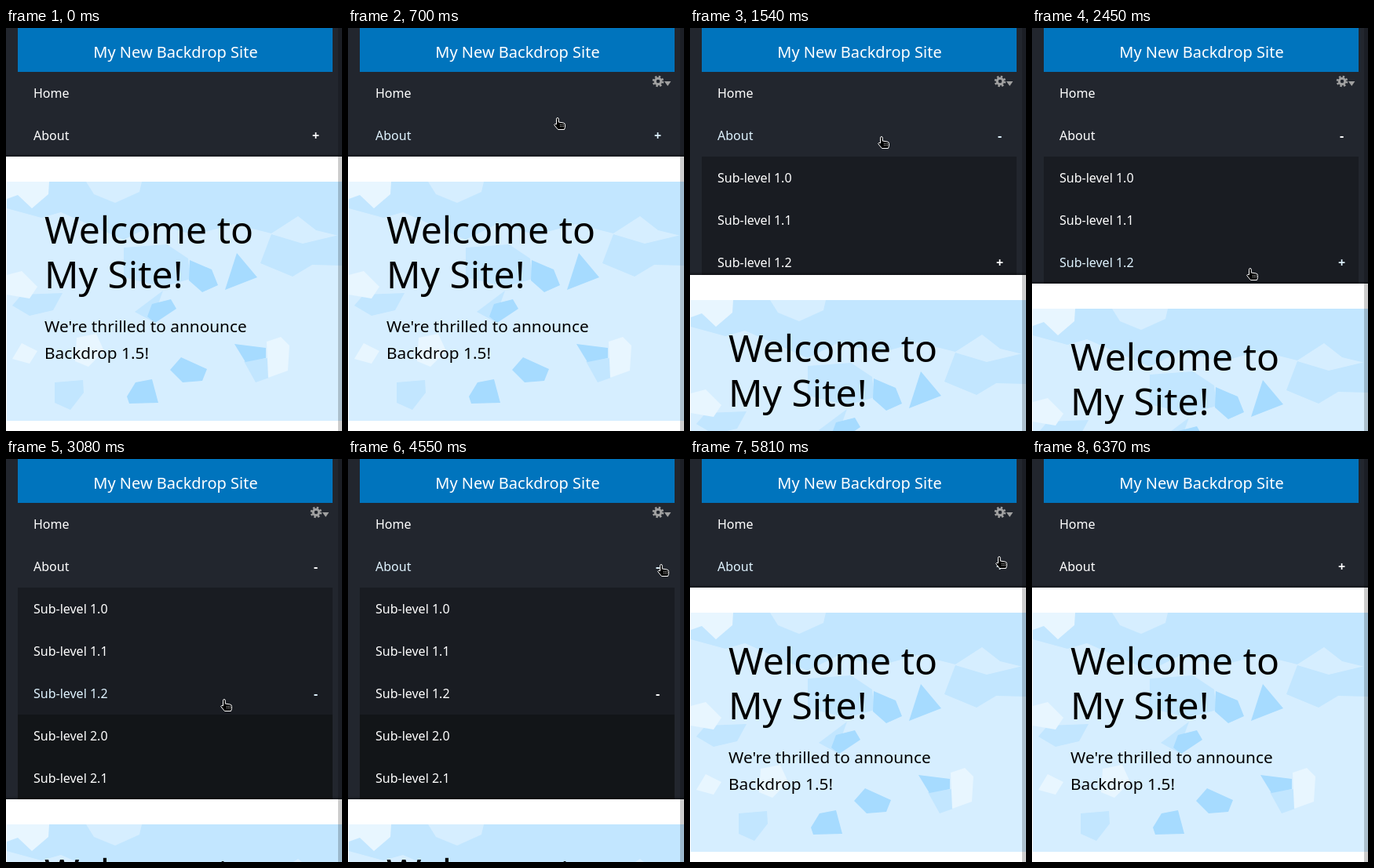
An HTML page for the animation above (8750 ms loop, 428 by 514 pixels).

```html
<!DOCTYPE html>
<html lang="en">
<head>
<meta charset="utf-8">
<title>Mobile menu</title>
<style>
  html, body { margin: 0; width: 100%; height: 100%; overflow: hidden; background: #fff; }
  svg { display: block; }
  text { font-family: "Noto Sans", "Open Sans", sans-serif; }
  #menu text { font-size: 16px; fill: #fff; }
  #menu .sign { font-weight: 700; text-anchor: middle; }
  #menu .hover text { fill: #dff3ff; }
</style>
</head>
<body>
<svg width="428" height="514" viewBox="0 0 428 514">
  <defs>
    <linearGradient id="shade" x2="0" y2="1">
      <stop offset="0" stop-opacity="0"/>
      <stop offset="1" stop-opacity=".4"/>
    </linearGradient>
  </defs>

  <g id="page">
    <svg x="1" y="196" width="427" height="305" viewBox="1 196 427 305">
      <path fill="#d6eeff" d="M1 196h427v305H1z"/>
      <g fill="#c2e6ff">
        <path d="M1 196H428V266L395 258 372 240 338 262 290 250 240 264 190 250 150 270 70 235 45 242 1 230z"/>
        <path d="M338 263 378 275 428 263V303L390 302 365 317 324 300z"/>
        <path d="M150 280 205 276 232 294 235 320 200 330 150 318z"/>
        <path d="M20 340 72 338 60 360 30 367 8 354z"/>
        <path d="M62 452 98 449 99 465 82 487 62 478z"/>
        <path d="M303 425 334 421 335 446 318 452z"/>
        <path d="M164 362 200 335 186 374z"/>
      </g>
      <path fill="#d6eeff" d="M102 196H173L170 209 139 223 112 212z"/>
      <g fill="#a6dbff">
        <path d="M234 296 262 308 270 328 250 337 233 322z"/>
        <path d="M294 287 320 318 279 334z"/>
        <path d="M186 352 210 346 217 358 190 376 180 368z"/>
        <path d="M291 403 331 408V421L305 426z"/>
        <path d="M223 420 256 435 250 450 225 452 209 436z"/>
        <path d="M165 452 186 448 194 478 157 479 154 470z"/>
      </g>
      <g fill="#e8f6ff">
        <path d="M1 196H55L54 212 33 230 15 213 1 218z"/>
        <path d="M332 400 350 394 361 405 359 437 334 446z"/>
        <path d="M90 395 115 390 125 412 105 432 88 425z"/>
        <path d="M1 315 20 310 40 330 30 345 1 340z"/>
        <path d="M20 402 40 412 30 428 8 422z"/>
      </g>
    </svg>
    <g font-size="48">
      <text x="49" y="275">Welcome to</text>
      <text x="49" y="332">My Site!</text>
    </g>
    <g font-size="20.8">
      <text x="49" y="388">We're thrilled to announce</text>
      <text x="49" y="422">Backdrop 1.5!</text>
    </g>
  </g>

  <svg id="menu" width="428" height="164">
    <path fill="#22262e" d="M0 0h428v514H0z"/>
    <path fill="#191c22" d="M15 164h401v162H15z"/>
    <path fill="#121518" d="M15 326h401v108H15z"/>
    <path fill="#0074bd" d="M15 0h401v56H15z"/>
    <text x="216" y="38" text-anchor="middle" style="font-size:20px">My New Backdrop Site</text>
    <g id="rows"></g>
    <rect id="edge" width="428" height="4" fill="url(#shade)"/>
  </svg>

  <g id="gear" fill="#a0a0a0">
    <circle cx="395" cy="68" r="3.8" fill="none" stroke="#a0a0a0" stroke-width="3"/>
    <circle cx="395" cy="68" r="6" fill="none" stroke="#a0a0a0" stroke-width="2.6" stroke-dasharray="2.4 2.312"/>
    <path d="M403 68h8.4l-4.2 6z"/>
  </g>
  <path d="M423 0h5v514h-5z" opacity=".2"/>

  <g id="hand">
    <path stroke="#fff" stroke-linejoin="round" d="M3.5 8.8V2.2q0-1.7 1.4-1.7t1.4 1.7V6l6 1q2.2.4 2.2 2.4v3.1l-1 3h-8L2.6 12 .6 9.4q.6-1.6 2.9-.6z"/>
    <path stroke="#fff" stroke-width=".8" stroke-dasharray="1 1" d="M8.5 9v4M10.5 9v4M12.5 9v4"/>
  </g>
</svg>

<script>
const LOOP = 8750, TICK = 70, SLIDE = 200;
const MENU_TOP = 56, ROW = 54, CLOSED = 164;
const OPEN_ABOUT = 1373, OPEN_SUB = 2877, CLOSE_ABOUT = 5034;
const labels = ["Home", "About", "Sub-level 1.0", "Sub-level 1.1", "Sub-level 1.2", "Sub-level 2.0", "Sub-level 2.1"];

// time, x, y of the pointer
const path = [
  [210, 411, 223], [490, 330, 40], [770, 239, 138],
  [1960, 239, 138], [2450, 273, 306],
  [3570, 273, 306], [3850, 340, 262], [4200, 412, 176], [4340, 413, 150], [4480, 395, 137],
  [4550, 394, 134], [4620, 392, 137], [4690, 392, 137], [4760, 390, 136],
  [5740, 390, 136], [6090, 384, 74], [6370, 372, -20]
];

const $ = id => document.getElementById(id);
const [page, menu, edge, gear, hand] = ["page", "menu", "edge", "gear", "hand"].map($);

function addText(parent, x, y, content, className = "") {
  const el = document.createElementNS("http://www.w3.org/2000/svg", "text");
  el.setAttribute("x", x);
  el.setAttribute("y", y);
  el.setAttribute("class", className);
  el.textContent = content;
  parent.append(el);
  return el;
}

const rows = labels.map((label, i) => {
  const g = document.createElementNS("http://www.w3.org/2000/svg", "g");
  const y = MENU_TOP + ROW * i + 33;
  addText(g, 35, y, label);
  const sign = addText(g, 394.6, y, "", "sign");
  $("rows").append(g);
  return { g, sign };
});

const clamp = p => Math.min(1, Math.max(0, p));
const swing = (t, start) => 0.5 - Math.cos(Math.PI * clamp((t - start) / SLIDE)) / 2;
const move = (el, x, y) => el.setAttribute("transform", `translate(${x} ${y})`);
const show = (el, on) => el.setAttribute("visibility", on ? "visible" : "hidden");

function pointerAt(t) {
  const i = path.findIndex(k => k[0] > t);
  if (i < 1) return null;
  const [t0, x0, y0] = path[i - 1], [t1, x1, y1] = path[i];
  const p = (t - t0) / (t1 - t0);
  return [x0 + (x1 - x0) * p, y0 + (y1 - y0) * p].map(Math.round);
}

function draw(time) {
  const t = Math.floor(time % LOOP / TICK) * TICK;

  const opened = 3 * ROW * swing(t, OPEN_ABOUT) + 2 * ROW * swing(t, OPEN_SUB);
  const height = Math.round(CLOSED + opened * (1 - swing(t, CLOSE_ABOUT)));
  menu.setAttribute("height", height);
  move(edge, 0, height - 4);
  move(page, 0, height - CLOSED);

  rows[1].sign.textContent = t >= OPEN_ABOUT && t < CLOSE_ABOUT ? "-" : "+";
  rows[4].sign.textContent = t >= OPEN_SUB ? "-" : "+";

  const pointer = pointerAt(t);
  let hovered = -1;
  if (pointer) {
    const [x, y] = pointer;
    move(hand, x, y);
    if (x + 5 < 416 && y >= MENU_TOP && y < height) hovered = Math.floor((y - MENU_TOP) / ROW);
  }
  show(hand, pointer);
  show(gear, hovered >= 0);
  rows.forEach(({ g }, i) => g.setAttribute("class", i === hovered ? "hover" : ""));
}

const start = performance.now();
function tick() {
  draw(performance.now() - start);
  requestAnimationFrame(tick);
}
tick();
</script>
</body>
</html>
```
